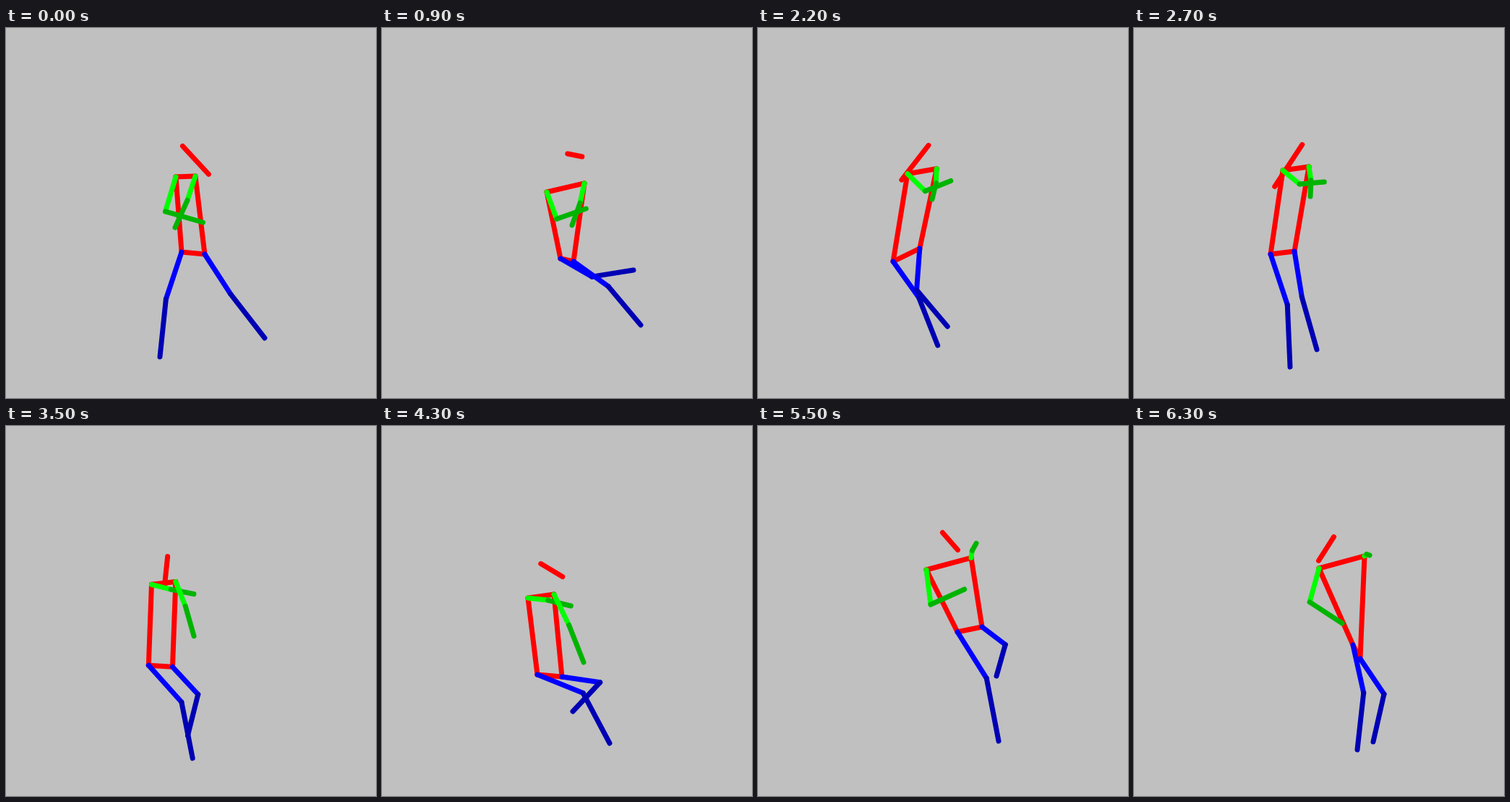
These frames come from a looping animation (512x512 px, 6400 ms). An HTML page with a canvas:

```html
<!DOCTYPE html>
<html>
<head>
<meta charset="utf-8">
<style>
  html, body { margin: 0; width: 100%; height: 100%; overflow: hidden; background: #c0c0c0; }
  canvas { display: block; }
</style>
</head>
<body>
<canvas id="stage" width="512" height="512"></canvas>
<script>
const ctx = document.getElementById('stage').getContext('2d');
const LOOP = 6.4, STEP = 0.1;
const KEY_TIMES = [0, 0.9, 1.7, 2.7, 4.3, 5.5, 6.3];
const RED = '#f00', GREEN = '#0f0', DARK_GREEN = '#00b400', BLUE = '#00f', DARK_BLUE = '#0000b4';

// Smooth curve through one value per key time.
const track = (...values) => t => {
  const last = values.length - 1;
  const slope = i => {
    const a = Math.max(i - 1, 0), b = Math.min(i + 1, last);
    return (values[b] - values[a]) / (KEY_TIMES[b] - KEY_TIMES[a]);
  };
  let i = 0;
  while (i < last - 1 && t >= KEY_TIMES[i + 1]) i++;
  const span = KEY_TIMES[i + 1] - KEY_TIMES[i];
  const u = (t - KEY_TIMES[i]) / span, v = 1 - u;
  return v * v * (1 + 2 * u) * values[i] + u * u * (1 + 2 * v) * values[i + 1]
    + span * u * v * (v * slope(i) - u * slope(i + 1));
};
const path = (xs, ys) => {
  const x = track(...xs), y = track(...ys);
  return t => [x(t), y(t)];
};
const add = ([x, y], [dx, dy]) => [x + dx, y + dy];
const wave = (t, start, period) => Math.sin(2 * Math.PI * (t - start) / period);

// The body hangs on the left hip; offsets run from the parent joint.
const hipPath = path([243, 247, 195, 189, 215, 276, 303], [310, 319, 335, 313, 344, 285, 303]);
const pelvis = path([32, 18, 38, 33, 34, 34, 10], [3, 4, -28, -4, 3, -7, 19]);
const spine = path([-8, -19, 15, 17, -13, -43, -47], [-104, -92, -122, -116, -106, -86, -106]);
const shoulderWidth = track(27, 52, 46, 36, 36, 62, 63);
const headTilt = path([36, 20, -23, -38, 30, 21, -21], [39, 4, 29, 58, 18, 24, 33]);
const leftReach = track(63, 23, 5, 16, 11, 27, 76);
const rightReach = path([-28, -17, -12, 2, 41, 7, 7], [71, 58, 50, 41, 94, -20, -1]);
const leftStep = path([213, 348, 301, 216, 315, 333, 309], [455, 335, 395, 469, 439, 436, 448]);
const rightStep = path([358, 358, 284, 253, 264, 330, 331], [429, 411, 378, 445, 395, 346, 437]);
const leftElbowBend = track(-37, -29, -27, -12, 2, -40, -30);
const leftKneeBend = track(-8, -18, 3, 11, 25, 15, 12);
const rightKneeBend = track(-3, 8, -33, -4, 48, 24, 25);

function line(from, to, color) {
  ctx.strokeStyle = color;
  ctx.beginPath();
  ctx.moveTo(...from);
  ctx.lineTo(...to);
  ctx.stroke();
}

// The middle joint lies just before halfway and is pushed sideways by the bend.
function limb(start, end, bend, upperColor, lowerColor) {
  const dx = end[0] - start[0], dy = end[1] - start[1];
  const push = bend / (Math.hypot(dx, dy) || 1);
  const middle = add(start, [0.46 * dx + dy * push, 0.46 * dy - dx * push]);
  line(start, middle, upperColor);
  line(middle, end, lowerColor);
}

function drawFigure(t) {
  const width = shoulderWidth(t), rise = 0.45 * (25 - width);
  const leftHip = hipPath(t);
  const rightHip = add(leftHip, pelvis(t));
  const leftShoulder = add(leftHip, spine(t));
  const rightShoulder = add(leftShoulder, [width, rise]);
  const neck = add(leftShoulder, [width / 2, rise / 2]);
  const headTop = add(neck, [10 * wave(t, 0.4, 8) - 1, -40 - 7 * wave(t, -0.2, 4)]);
  const leftHand = add(leftShoulder, [64 - 0.42 * leftReach(t), leftReach(t)]);
  const rightHand = add(rightShoulder, rightReach(t));

  line(headTop, add(headTop, headTilt(t)), RED);
  line(leftShoulder, rightShoulder, RED);
  line(leftShoulder, leftHip, RED);
  line(rightShoulder, rightHip, RED);
  line(leftHip, rightHip, RED);
  limb(leftShoulder, leftHand, leftElbowBend(t), GREEN, DARK_GREEN);
  limb(rightShoulder, rightHand, 2, GREEN, DARK_GREEN);
  limb(leftHip, leftStep(t), leftKneeBend(t), BLUE, DARK_BLUE);
  limb(rightHip, rightStep(t), rightKneeBend(t), BLUE, DARK_BLUE);
}

ctx.lineWidth = 7;
ctx.lineCap = 'round';

function draw() {
  const step = Math.floor(performance.now() / 1000 % LOOP / STEP + 1e-6);
  ctx.fillStyle = '#c0c0c0';
  ctx.fillRect(0, 0, 512, 512);
  drawFigure(step * STEP);
  requestAnimationFrame(draw);
}
draw();
</script>
</body>
</html>
```
